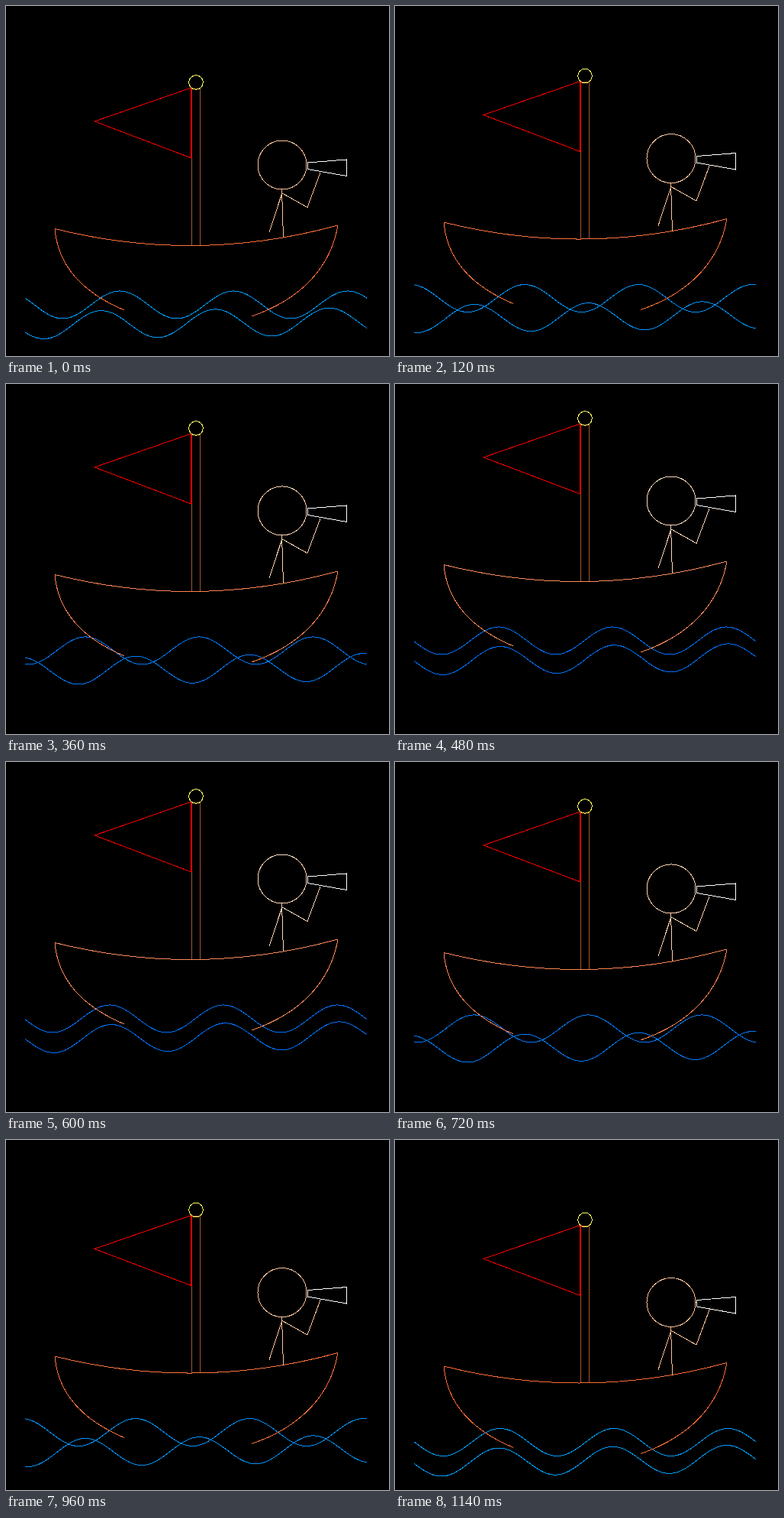
Write an HTML page that moves like this. It is 502 by 458 pixels and loops after 1.2 s.

```html
<!DOCTYPE html>
<html lang="en">
<head>
<meta charset="utf-8">
<title>Sailing boat</title>
<style>
  /* --p: 0 = boat at its lowest, 1 = at its highest */
  @property --p { syntax: "<number>"; inherits: true; initial-value: 0; }

  html, body { margin: 0; width: 100%; height: 100%; overflow: hidden; background: #000; }

  svg {
    display: block;
    width: 502px;
    height: 458px;
    fill: none;
    stroke-width: 1;
    shape-rendering: crispEdges;
    animation: swell 1200ms step-end infinite;
  }

  @keyframes swell {
    0%, 90% { --p: .075; }
    5%, 85% { --p: .14; }
    10%, 80% { --p: .215; }
    15%, 75% { --p: .4; }
    20%, 70% { --p: .588; }
    25%, 65% { --p: .685; }
    30%, 60% { --p: .772; }
    35%, 55% { --p: .9; }
    40%, 50% { --p: .987; }
    45% { --p: 1; }
    95%, 100% { --p: 0; }
  }

  .scene { transform: translateY(calc(4.5px - var(--p) * 60.3px)); }
  .near { transform: translate(calc(137.8px + var(--p) * 149.33px), 391px); }
  .far { transform: translate(calc(135.8px - var(--p) * 149.33px), 418.2px); }

  .sea { stroke: color-mix(in srgb, #0070ff calc(var(--p) * 100%), #009dff); }
  .hull { stroke: color-mix(in srgb, #ff8a5c calc(var(--p) * 100%), #ff6b35); }
  .sailor { stroke: color-mix(in srgb, #ffd6b8 calc(var(--p) * 100%), #ffbe94); }
  .mast { stroke: #a0562f; }
  .flag { stroke: #f00; }
  .pole { fill: #f00; }
  .ball { stroke: #ffff5c; }
  .scope { stroke: #fff; }
</style>
</head>
<body>
<svg viewBox="0 0 502 458">
  <clipPath id="span"><rect x="25" y="-100" width="448" height="700"/></clipPath>
  <g class="scene">
    <g class="sea" clip-path="url(#span)">
      <path class="near wave"/>
      <g transform="matrix(1 -.012 0 1 0 0)"><path class="far wave"/></g>
    </g>

    <path class="mast" d="M243.5 313.5V108.3H254.5V313.5"/>
    <path class="flag" d="M243 107L116 151L243 199"/>
    <rect class="pole" x="242" y="107" width="2" height="92"/>
    <circle class="ball" cx="249" cy="100" r="9.3"/>

    <g class="hull">
      <path d="M64 291.5Q249.5 337.7 435 287"/>
      <path d="M64 291.5C68 338 98 374 155 398"/>
      <path d="M435 287C426 340 389 383 322 406"/>
    </g>

    <g class="sailor">
      <circle cx="362" cy="208" r="32"/>
      <path d="M361.5 240L363.5 303.5M361.5 246L345 296M362 245L395 263.5L412 218"/>
    </g>
    <path class="scope" d="M395.5 205L446.5 201V222.5L395.5 213.5Z"/>
  </g>
</svg>
<script>
  // Cosine wave with a crest at x = 0, three periods across the sea
  const period = 448 / 3, height = 18;
  let d = "";
  for (let x = -300; x <= 650; x += 2) {
    const y = -height * Math.cos(2 * Math.PI * x / period);
    d += (d ? "L" : "M") + x + " " + y.toFixed(2);
  }
  document.querySelectorAll(".wave").forEach(w => w.setAttribute("d", d));
</script>
</body>
</html>
```
